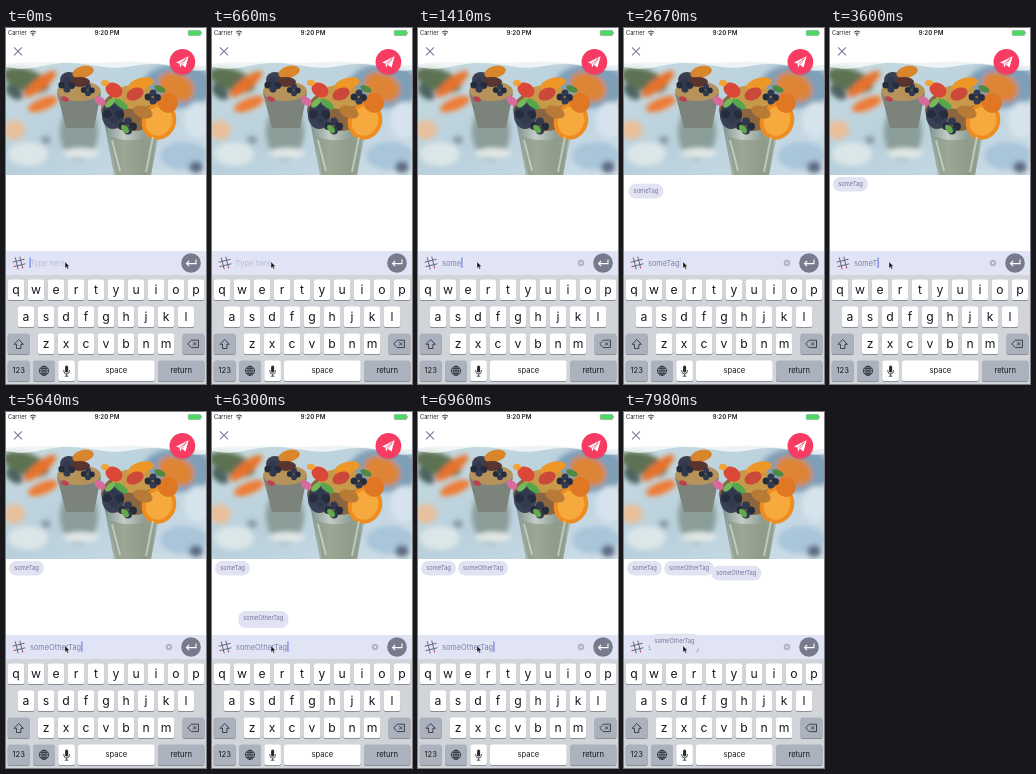
An HTML page that plays this animation: 200 px wide and 356 px high, repeating every 8 s.

```html
<!DOCTYPE html>
<html lang="en">
<head>
<meta charset="utf-8">
<title>Tag input</title>
<style>
  html, body { margin: 0; width: 100%; height: 100%; overflow: hidden; background: #fff; }
  svg { display: block; width: 100%; height: 100%; }
  text { font-family: Inter, Roboto, sans-serif; }
  .field { font-size: 7.4px; }
  .chip rect { fill: #e1e3f3; }
  .chip text { font-size: 5.8px; fill: #73779b; }
</style>
</head>
<body>
<svg id="stage" viewBox="0 0 200 356">
  <defs>
    <filter id="soft"><feGaussianBlur stdDeviation="2.6"/></filter>
    <filter id="crisp"><feGaussianBlur stdDeviation=".55"/></filter>
    <clipPath id="frame"><path d="M0 32H200V147H0Z"/></clipPath>
    <linearGradient id="table" x2="1" y2="1">
      <stop stop-color="#c8dbe1"/><stop offset=".5" stop-color="#b9d0dc"/><stop offset="1" stop-color="#cfdfe8"/>
    </linearGradient>
    <linearGradient id="glass" x2="1">
      <stop stop-color="#758b88"/><stop offset=".35" stop-color="#c4cdc5"/>
      <stop offset=".7" stop-color="#8b9c94"/><stop offset="1" stop-color="#b6c9ce"/>
    </linearGradient>
  </defs>

  <rect width="200" height="356" fill="#fff"/>
  <g id="photo" clip-path="url(#frame)"></g>
  <path d="M0 30H200V42C184 45 170 37 150 36S118 42 98 39 62 33 42 37 16 42 0 39Z" fill="#fff" opacity=".72"/>
  <path d="M0 30H200V37C165 40 145 31 110 34S40 32 0 36Z" fill="#fff"/>

  <g id="status" fill="#222">
    <text x="2" y="7.2" font-size="5.7">Carrier</text>
    <text x="101" y="7.3" font-size="6.2" font-weight="600" text-anchor="middle">9:20 PM</text>
    <g fill="none" stroke="#222" stroke-width=".9">
      <path d="M24 4.2q3-2.6 6 0M25.3 5.7q1.7-1.4 3.4 0"/>
    </g>
    <circle cx="27" cy="7" r=".8"/>
    <rect x="182.3" y="2.4" width="12.4" height="5.2" rx="1" fill="#4cd964" stroke="#69816d" stroke-width=".4"/>
    <path d="M195.4 4v2q1.2-1 0-2"/>
  </g>
  <path d="M8 19.3l8 8m0-8l-8 8" stroke="#777d9d" stroke-width="1.1" fill="none"/>
  <circle cx="176.4" cy="34.8" r="13" fill="#8a3550" opacity=".2"/>
  <circle cx="176.4" cy="33.8" r="12.8" fill="#f83b62"/>
  <path d="M170 34.4L182.6 28.2 179.5 39.5 175.8 36.8 174 39.6 173.6 35.8Z" fill="#fff"/>
  <path d="M173.6 35.8L180.3 30.4 175.8 36.8" fill="none" stroke="#f83b62" stroke-width=".7"/>

  <rect y="223" width="200" height="24.5" fill="#e1e4f5"/>
  <g transform="translate(13 235) rotate(-14)" fill="none" stroke="#61657d" stroke-width=".9">
    <path d="M-2.3-6V6M2.3-6V6M-6-2.3H6M-6 2.3H6"/>
    <path d="M-6 2.3h1M5-2.3h1M2.3 5v1M-2.3-6v1" stroke="#f83b62" stroke-width="1.4"/>
  </g>
  <text id="entry" class="field" x="24" y="237.8"></text>
  <rect id="caret" y="229.5" width="1" height="10.5" fill="#5870e8"/>
  <g id="clear">
    <circle cx="163" cy="235" r="3.3" fill="#b2b5c5"/>
    <path d="M161.7 233.7l2.6 2.6m0-2.6l-2.6 2.6" stroke="#eef0fa" stroke-width=".7"/>
  </g>
  <circle cx="185" cy="235" r="9.8" fill="#777b8b"/>
  <path d="M190 231.4v4.2h-9.5m2.6-2.6l-2.6 2.6 2.6 2.6" fill="none" stroke="#fff" stroke-width="1.1"/>

  <g id="keyboard"></g>
  <g id="chips"></g>
  <path d="M59 233.8v6.4l1.5-1.3 1 2.3 1.1-.5-1-2.2h2Z" fill="#111" stroke="#fff" stroke-width=".4"/>
</svg>
<script>
const LOOP = 8000, FLIGHT = 500;
const $ = id => document.getElementById(id);

function paintPhoto() {
  const blob = (x, y, rx, ry, fill, turn = 0) =>
    `<ellipse cx="${x}" cy="${y}" rx="${rx}" ry="${ry}" fill="${fill}" transform="rotate(${turn} ${x} ${y})"/>`;
  const berries = (x, y, r) => [[-1, 0], [0, -.8], [.9, .1], [0, .8]]
    .map(([dx, dy], i) => blob(x + dx * r * 1.4, y + dy * r * 1.4, r, r, i % 2 ? '#30394f' : '#242c3d')).join('');

  $('photo').innerHTML = `
    <rect y="30" width="200" height="118" fill="url(#table)"/>
    <g filter="url(#soft)">
      ${blob(20, 52, 24, 11, '#5d7253', 18)}
      ${blob(34, 56, 20, 6, '#e8722c', -38)}
      ${blob(37, 76, 16, 6, '#ef7b34', -22)}
      ${blob(8, 64, 10, 6, '#4e6360', 40)}
      ${blob(8, 102, 11, 10, '#e8c09c')}
      ${blob(22, 126, 20, 12, '#dbe6e8')}
      ${blob(40, 112, 5, 4, '#8c96a4')}
      ${blob(172, 58, 36, 22, '#7e9fb8')}
      ${blob(170, 59, 19, 14, '#dd8434', 25)}
      ${blob(192, 92, 14, 18, '#d6e3ec')}
      ${blob(178, 128, 24, 14, '#a9c5d9')}
      ${blob(190, 139, 7, 6, '#5d6a83')}
      ${blob(73, 104, 19, 28, '#8a9d99')}
      ${blob(75, 125, 18, 5, '#e2e9e8')}
    </g>
    <g filter="url(#crisp)">
      <path d="M51 65H95L88 100H60Z" fill="#7c837b"/>
      ${blob(73, 63, 22, 10, '#b6935a')}
      ${blob(63, 52, 9, 8, '#3a4050')}
      ${blob(77, 44, 11, 6, '#d9852b', -15)}
      ${blob(74, 54, 10, 5, '#5a352f')}
      ${berries(61, 57, 3.6)}${berries(82, 62, 3)}
      ${blob(59, 71, 4, 2.4, '#bd4150', 20)}
      <path d="M96 82H158L145 147H108Z" fill="url(#glass)"/>
      <path d="M104 108Q126 118 151 105L145 147H110Z" fill="#8f9b84" opacity=".75"/>
      ${blob(126, 82, 31, 21, '#8b6540')}
      ${blob(128, 69, 22, 12, '#c79a4b')}
      ${blob(153, 93, 17, 19, '#ed8d21', 24)}
      ${blob(153, 93, 13, 15, '#f6aa3d', 24)}
      ${blob(162, 75, 10, 10, '#df7723')}
      ${blob(135, 56, 13, 6, '#ec9726', -16)}
      ${blob(108, 62, 9, 7, '#db4837', 30)}
      ${blob(129, 66, 9, 6, '#cc4939', -24)}
      ${blob(107, 87, 11, 14, '#394054')}
      ${berries(108, 86, 4.5)}${berries(122, 98, 4)}${berries(147, 69, 3.5)}
      ${blob(115, 76, 8, 3.5, '#58a64a', 35)}
      ${blob(104, 75, 6, 3, '#75b95a', -42)}
      ${blob(119, 101, 5, 3, '#65a94d', 50)}
      ${blob(154, 61, 6, 3, '#4c8a43', 25)}
      ${blob(94, 73, 6, 4, '#d96a9c', 35)}
      ${blob(99, 55, 4, 3, '#efa435')}
      ${blob(137, 84, 10, 6, '#b77b36', 20)}
      <path d="M106 112L114 143M147 109L140 144" stroke="#e0eaea" stroke-width="2" opacity=".55"/>
    </g>`;
}

function paintKeyboard() {
  const key = (x, y, w, label = '', size = 8, dark = false) => `
    <rect x="${x}" y="${y + .9}" width="${w}" height="20.6" rx="2.6" fill="#8b9096"/>
    <rect x="${x}" y="${y}" width="${w}" height="20.6" rx="2.6" fill="${dark ? '#abb2bd' : '#fff'}"/>
    <text x="${x + w / 2}" y="${y + 10.3 + size * .34}" font-size="${size}" text-anchor="middle" fill="#17191c">${label}</text>`;
  const rows = ['qwertyuiop', 'asdfghjkl', 'zxcvbnm'].map((row, r) =>
    [...row].map((c, i) => key([1.7, 11.7, 31.7][r] + i * 20, 251.5 + r * 27, 16.6, c, 12.2)).join(''));

  $('keyboard').innerHTML = `
    <rect y="247" width="200" height="109" fill="#d1d5da"/>
    ${rows.join('')}
    ${key(1.7, 305.5, 22, '', 8, true)}
    ${key(176.5, 305.5, 22, '', 8, true)}
    ${key(1.7, 332.5, 22, '123', 7.6, true)}
    ${key(27, 332.5, 22, '', 8, true)}
    ${key(52.3, 332.5, 16.6)}
    ${key(72, 332.5, 76.7, 'space', 7.6)}
    ${key(152, 332.5, 46.5, 'return', 7.6, true)}
    <g fill="none" stroke="#25282c" stroke-width=".8" stroke-linejoin="round">
      <path d="M12.7 311.5l-4.6 4.8h2.4v4.2h4.4v-4.2h2.4Z"/>
      <path d="M185.2 312.2h7.3v7.4h-7.3l-3.4-3.7ZM187 314.2l3.4 3.4m0-3.4l-3.4 3.4"/>
      <circle cx="38" cy="342.8" r="4.6"/>
      <ellipse cx="38" cy="342.8" rx="2.1" ry="4.6"/>
      <path d="M33.4 342.8h9.2M38 338.2v9.2M34.3 340.4h7.4M34.3 345.2h7.4"/>
      <path d="M57.8 342v1q0 3 2.8 3t2.8-3v-1M60.6 346v2.2m-1.8 0h3.6"/>
    </g>
    <rect x="59.1" y="337.6" width="3" height="6.8" rx="1.5" fill="#25282c"/>`;
}

// Each entry: time of the key press and the field's value afterwards.
const edits = [];
const type = (text, times) => times.forEach(t => edits.push([t, text(edits.length ? edits.at(-1)[1] : '')]));
const add = (letters, times) => times.forEach((t, i) => type(s => s + letters[i], [t]));
add('someTag', [750, 930, 1110, 1290, 1530, 1700, 1870]);
type(s => s.slice(0, -1), [3300, 3460, 3620]);
add('OtherTag', [4140, 4380, 4620, 4780, 4940, 5160, 5320, 5480]);

const chips = [
  { text: 'someTag', start: 2267, x: 3, w: 35 },
  { text: 'someOtherTag', start: 6100, x: 40, w: 50 },
  { text: 'someOtherTag', start: 7562, x: 92, w: 50 },
  { text: 'someOtherTag', start: 7908, x: 144, w: 50 },
];

paintPhoto();
paintKeyboard();
$('chips').innerHTML = chips.map(c => `
  <g class="chip"><rect y="-7.2" width="${c.w}" rx="7.2"/>
  <text x="${c.w / 2}" y="2" text-anchor="middle">${c.text}</text></g>`).join('');
chips.forEach((c, i) => c.node = $('chips').children[i]);

function drawField(t) {
  const last = edits.findLast(([time]) => time <= t);
  const value = last ? last[1] : '';
  const entry = $('entry');
  entry.textContent = value || 'Type here';
  entry.setAttribute('fill', value ? '#7d81a6' : '#b8bcd5');
  $('clear').style.display = value ? '' : 'none';

  const launching = chips.some(c => t >= c.start && t < c.start + 150);
  const justTyped = last && t - last[0] < 500;
  const lit = justTyped || (t + 100) % 1000 < 600;
  $('caret').setAttribute('x', 24 + (value ? entry.getComputedTextLength() + .3 : -.4));
  $('caret').setAttribute('opacity', launching ? 0 : lit ? 1 : .15);
}

function drawChip({ node, start, x }, t) {
  node.style.display = t < start ? 'none' : '';
  const u = Math.min(1, Math.max(0, (t - start) / FLIGHT));
  const p = (1 - Math.cos(Math.PI * u)) / 2;
  node.setAttribute('transform', `translate(${19 + (x - 19) * p} ${233 + (156.2 - 233) * p})`);
  node.firstElementChild.setAttribute('height', 14.4 + 4 * (1 - p));
}

const origin = performance.now();
function draw() {
  const t = (performance.now() - origin) % LOOP;
  drawField(t);
  chips.forEach(c => drawChip(c, t));
  requestAnimationFrame(draw);
}
draw();
</script>
</body>
</html>
```
